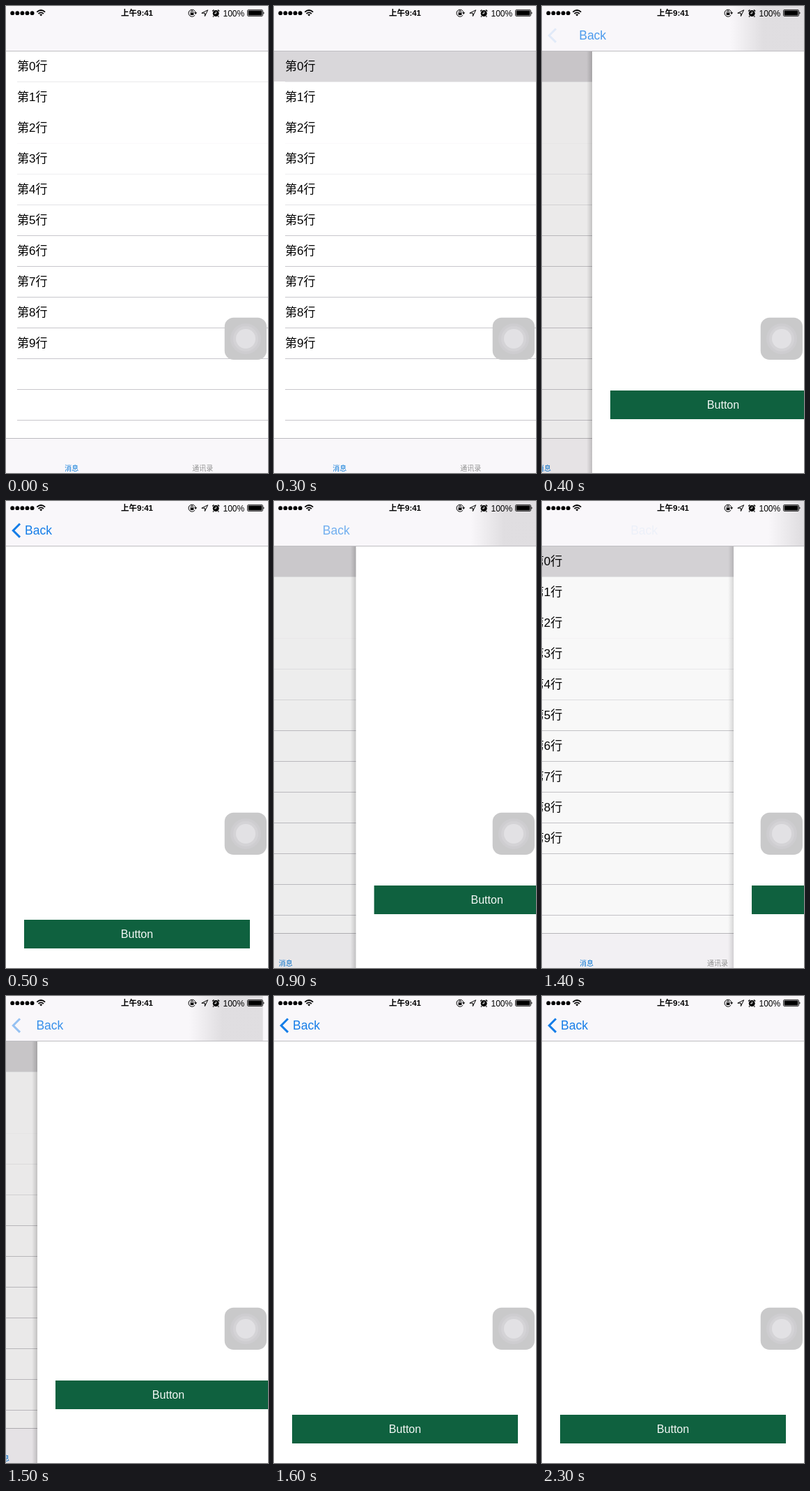
Write an HTML page that moves like this. It is 376 px wide and 668 px high and loops after 2400 ms.

```html
<!DOCTYPE html>
<html lang="zh">
<head>
<meta charset="utf-8">
<style>
html, body { margin: 0; width: 100%; height: 100%; overflow: hidden; background: #fff; }
svg { display: block; width: 376px; height: 668px; font-family: "Liberation Sans", "Noto Sans CJK SC", "Noto Sans CJK", sans-serif; }
.mid { text-anchor: middle; }
.line { fill: none; stroke: #000; stroke-width: 1; }
</style>
</head>
<body>
<svg viewBox="0 0 376 668">
  <defs>
    <linearGradient id="edge">
      <stop offset="0" stop-color="#000" stop-opacity="0"/>
      <stop offset="1" stop-color="#000" stop-opacity=".17"/>
    </linearGradient>
    <linearGradient id="haze">
      <stop offset="0" stop-color="#dddbde" stop-opacity="0"/>
      <stop offset=".45" stop-color="#dddbde"/>
      <stop offset="1" stop-color="#dddbde"/>
    </linearGradient>
  </defs>

  <g id="list">
    <rect width="376" height="668" fill="#fff"/>
    <rect id="picked" y="65" width="376" height="43" fill="#d9d7da"/>
    <g id="rows" font-size="17"></g>
    <rect y="618" width="376" height="50" fill="#f9f7fa"/>
    <rect y="618" width="376" height="1" fill="#bcbbbf"/>
    <g class="mid" font-size="10">
      <text x="94.3" y="664.5" fill="#0a7ad8">消息</text>
      <text x="282.3" y="664.5" fill="#929292">通讯录</text>
    </g>
    <rect id="dim" width="376" height="668" fill="#0c0008"/>
  </g>

  <g id="detail">
    <rect id="shadow" x="-8" y="64" width="8" height="604" fill="url(#edge)"/>
    <rect width="376" height="668" fill="#fff"/>
    <g id="button">
      <rect x="26" width="324" height="41" fill="#0f613f"/>
      <text class="mid" x="188" y="26" font-size="16" fill="#f4f8f6">Button</text>
    </g>
  </g>

  <rect width="376" height="64" fill="#f9f7fa"/>
  <rect id="glow" width="106" height="64" fill="url(#haze)"/>
  <rect y="64" width="376" height="1" fill="#bfbec2"/>
  <path id="chevron" d="M20 32.5L10.3 42.2L20 51.9" fill="none" stroke="#147de8" stroke-width="3"/>
  <text id="back" y="48" font-size="17.5" fill="#147de8">Back</text>

  <g id="status">
    <g id="dots"></g>
    <g class="line">
      <path d="M44.3 8.7Q50.2 3.4 56.1 8.7" stroke-width="1.8"/>
      <path d="M46.5 11Q50.2 7.7 53.9 11" stroke-width="1.7"/>
    </g>
    <path d="M48.2 12.3Q50.2 10.8 52.2 12.3L50.2 14.6Z"/>
    <text class="mid" x="188" y="14.3" font-size="11.5" font-weight="bold">上午9:41</text>
    <path class="line" d="M271.2 13A5 5 0 1 1 272 9.6"/>
    <path d="M270 9.2h4.2l-2.1 2.8zM264.6 9.4h4.8v3.6h-4.8z"/>
    <path class="line" d="M265.6 9.5V8.2a1.4 1.4 0 0 1 2.8 0V9.5"/>
    <path class="line" d="M280.8 10.2L289.6 5.8L285.4 14.6V10.2Z"/>
    <circle cx="301.2" cy="10.6" r="4.5"/>
    <path class="line" d="M296.2 7.4L298.4 5.4M306.2 7.4L304 5.4M298 14.4L297 15.4M304.4 14.4L305.4 15.4" style="stroke-width:1.4"/>
    <path d="M301.4 7.8V10.8H299" fill="none" stroke="#fff"/>
    <text x="311.5" y="14.5" font-size="12">100%</text>
    <rect class="line" x="346.5" y="5.5" width="22" height="9" rx="1.5" style="stroke-width:.8"/>
    <rect x="347.6" y="6.6" width="19.8" height="6.8" rx=".6"/>
    <path d="M369.4 8.2a2 2 0 0 1 0 3.6z"/>
  </g>

  <g id="assist">
    <rect x="313.7" y="445.7" width="60.3" height="60.3" rx="13" fill="#c9c9ca"/>
    <circle cx="344" cy="476" r="22" fill="#cecdd0"/>
    <circle cx="344" cy="476" r="18" fill="#d4d3d6"/>
    <circle cx="344" cy="476" r="14" fill="#e2e1e4"/>
  </g>
</svg>
<script>
const W = 376, STEP = 100, LOOP = 2400, TAP = 200;
// [time, left edge of the detail page]: push, swipe back, push again.
const moves = [
  [0, W], [300, W], [400, 72], [500, 0],
  [800, 0], [1100, 353], [1200, W],
  [1300, W], [1400, 275], [1500, 45], [1600, 0], [LOOP, 0]
];
const $ = id => document.getElementById(id);
const set = (id, attrs) => {
  for (const key in attrs) $(id).setAttribute(key, attrs[key]);
};
const add = (parent, tag, attrs, text = "") => {
  const node = document.createElementNS("http://www.w3.org/2000/svg", tag);
  for (const key in attrs) node.setAttribute(key, attrs[key]);
  node.textContent = text;
  $(parent).append(node);
};

const faint = [0.4, 0, 0.1, 0.3, 0.5];
for (let i = 0; i < 12; i++) {
  const y = 64 + i * 44;
  add("rows", "rect", { x: 16, y: y + 44, width: 360, height: 1, fill: "#c8c7cc", opacity: faint[i] ?? 1 });
  if (i < 10) add("rows", "text", { x: 16, y: y + 28 }, `第${i}行`);
}
for (let i = 0; i < 5; i++) add("dots", "circle", { cx: 9.2 + i * 7.1, cy: 10.2, r: 2.9 });

function edgeAt(t) {
  const i = moves.findIndex(move => move[0] > t);
  const [t0, x0] = moves[i - 1], [t1, x1] = moves[i];
  return x0 + (x1 - x0) * (t - t0) / (t1 - t0);
}

function draw(t) {
  const x = edgeAt(t), out = x / W;
  const moving = x > 0 && x < W;
  set("list", { transform: `translate(${0.3 * (x - W)})` });
  set("dim", { opacity: 0.1 * (1 - out) });
  set("picked", { opacity: t < TAP ? 0 : 1 });
  set("detail", { transform: `translate(${x})` });
  set("shadow", { opacity: Math.min(1, 3 * (1 - out)) });
  set("button", { transform: `translate(0 ${x ? 550 : 599})` });
  set("glow", { x: 270 + (x - 72) * 0.27, opacity: moving ? 0.9 : 0 });
  set("back", { x: 27 + 137 * out, opacity: Math.max(0, 1 - 1.3 * out) });
  set("chevron", { opacity: Math.max(0, 1 - x / 80) });
}

const start = performance.now();
function tick() {
  const t = (performance.now() - start) % LOOP;
  draw(t - t % STEP);
  requestAnimationFrame(tick);
}
tick();
</script>
</body>
</html>
```
